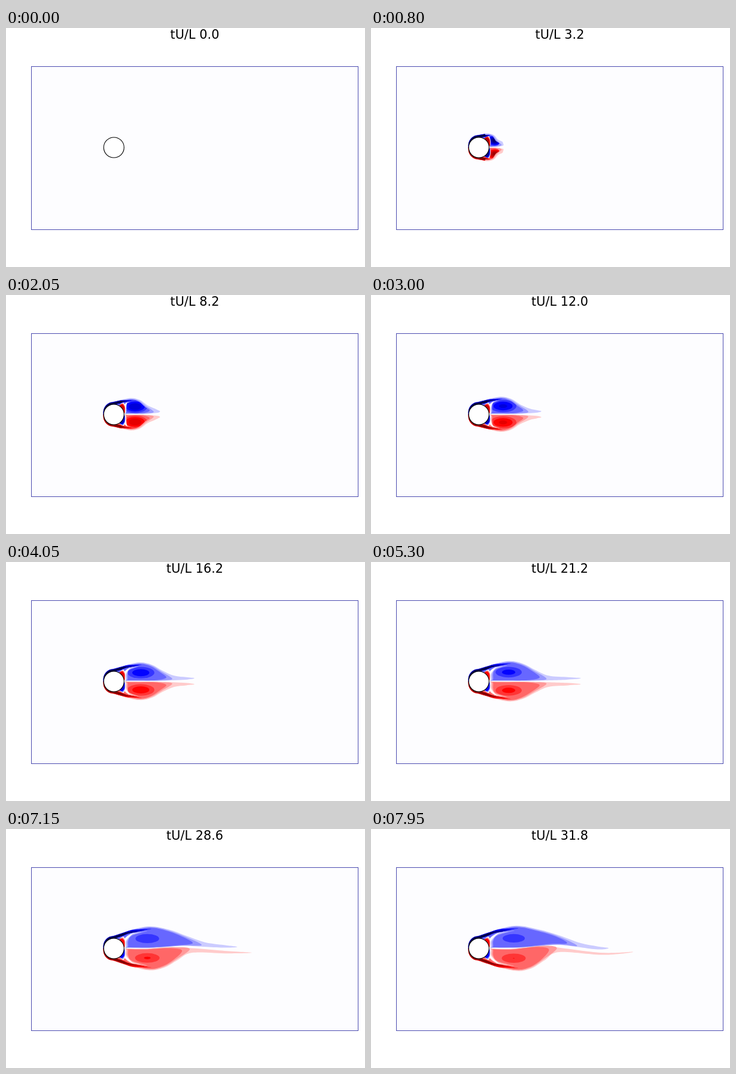
An HTML page with a canvas for the animation above (8000 ms loop, 600 by 400 pixels).

```html
<!DOCTYPE html>
<html lang="en">
<head>
<meta charset="utf-8">
<title>Cylinder wake vorticity</title>
<style>
html, body { margin: 0; width: 100%; height: 100%; overflow: hidden; background: #fff; }
canvas { display: block; }
</style>
</head>
<body>
<canvas id="stage" width="600" height="400"></canvas>
<script>
const ctx = document.getElementById('stage').getContext('2d');
const STEP_MS = 50, STEPS = 160, DT = 0.2;
const CX = 180.3, CY = 200, RADIUS = 17;

const mix = (a, b, f) => a + (b - a) * f;
const mixPoint = (p, q, f) => [mix(p[0], q[0], f), mix(p[1], q[1], f)];
const clamp = v => Math.max(0, Math.min(1, v));

// Shape of one half of the wake; x runs downstream, y outward from the axis.
// The wake spreads with the square root of time, its tip drifts linearly,
// and late in the run a sway bends both halves the same way.
function wakeAt(t, blue) {
  const root = Math.sqrt(t);
  const growth = 1 - Math.exp(-t / 1.2);
  const sway = Math.max(0, (t - 21) / 11) ** 1.5;
  const side = blue ? 1 : -1;

  const bend = (x, y) => {
    const wave = 6 * Math.sin(Math.PI * (x - 65) / 100) * clamp((x - 40) / 60);
    return [x, y + side * sway * wave * (1 - y / 25)];
  };

  const neckX = Math.max(18, 27.5 * root - 10) + sway * (blue ? 25 : -11);
  const tipX = 18 + 7.2 * t + sway * (blue ? -31 : 11);
  const peak = [11 * root - 2, 16 + 3.85 * root];
  const shoulder = (f, height) => bend(mix(peak[0], neckX, f), peak[1] * height);
  const tail = (f, y) => bend(mix(neckX, tipX, f), y);
  return {
    t, growth, peak, neckX, bend,
    lift: [Math.min(9 + 0.22 * t, 0.75 * peak[0]), 16.5 + (6.5 + t / 8) * growth],
    shoulder1: shoulder(0.36, 0.88),
    shoulder2: shoulder(0.67, 0.56),
    tail: [tail(0, 9.3), tail(0.6, 6.8), tail(1, 5), tail(0.55, 2.6)],
    core: [12 + 8.2 * root, 9 + 1.35 * root],
    strength: 2.8 + 12 / root - 0.08 * side * sway,
    coreRadius: 43 * (1 - Math.exp(-t / 8))
  };
}

// Level 0 is the background, 5 the pure hue, 10 the darkest shade.
function shade(level, blue) {
  const pale = Math.max(0, 253 - 50 * level);
  const full = 255 - Math.max(0, level - 5) * (blue ? 36 : 25);
  return blue ? `rgb(${pale},${pale},${full})` : `rgb(${full},${pale},${pale})`;
}

// Closed Catmull-Rom curve.
function blob(points, color) {
  const n = points.length, at = i => points[(i + n) % n];
  ctx.beginPath();
  ctx.moveTo(...points[0]);
  for (let i = 0; i < n; i++) {
    const [p, a, b, q] = [at(i - 1), at(i), at(i + 1), at(i + 2)];
    ctx.bezierCurveTo(a[0] + (b[0] - p[0]) / 6, a[1] + (b[1] - p[1]) / 6,
      b[0] - (q[0] - a[0]) / 6, b[1] - (q[1] - a[1]) / 6, b[0], b[1]);
  }
  ctx.fillStyle = color;
  ctx.fill();
}

// Boundary layer on the front quarter, thickening away from the stagnation point.
function frontArc(growth, depth) {
  return Array.from({ length: 5 }, (_, i) => {
    const angle = mix(0.04, Math.PI / 2, i / 4);
    const r = RADIUS + 0.2 + 4.1 * growth * depth * Math.sin(angle);
    return [-r * Math.cos(angle), r * Math.sin(angle)];
  });
}

function outerOutline(w) {
  return [[-8, 0], ...frontArc(w.growth, 1), w.lift, w.peak, w.shoulder1, w.shoulder2,
    ...w.tail, w.bend(w.neckX * 0.75, 0.8), w.bend(w.neckX * 0.4, 0.6), [16, 0.5]];
}

function innerOutline(w, reach, endY, inset) {
  const d = inset * w.growth, endX = w.neckX * reach;
  const inward = (p, k) => [p[0] - k * d, p[1] - 1.2 * d];
  return [[-8, 0], ...frontArc(w.growth, 0.9), inward(w.lift, 0), inward(w.peak, 0),
    inward(w.shoulder1, 1.2), inward(w.shoulder2, 2.2), w.bend(endX, endY),
    w.bend(endX * 0.8, 0.8 + d / 2), w.bend(endX * 0.45, 0.6 + d / 2), [16, 0.5 + d / 2]];
}

function drawCore(w, blue) {
  const flat = 0.38 + 0.45 * Math.exp(-w.t / 7);
  for (let level = 4; level < w.strength; level++) {
    const r = w.coreRadius * Math.sqrt(Math.log(w.strength / level));
    ctx.beginPath();
    ctx.ellipse(...w.core, r, r * flat, 0, 0, 2 * Math.PI);
    ctx.fillStyle = shade(level, blue);
    ctx.fill();
  }
}

// Pale tongue between the shear layer and the recirculating core.
function drawGap(w, blue) {
  const end = [w.peak[0] - 2, w.peak[1] * 0.78];
  const size = clamp((end[0] - 20) / 25);
  if (!size) return;
  const mid = [mix(18, end[0], 0.3), mix(16, end[1], 0.66)];
  for (const level of [2, 1, 0]) {
    const e = level * 2 * size;
    blob([[17, 1.5], [17.5, 15], mid, mixPoint(mid, end, 0.25 + 0.4 * level),
      [mid[0] + 1, mid[1] - size - e * 0.6], [20 + e, 12], [19.6 + e, 2.5]],
      shade(level, blue));
  }
}

function drawShearLayer(w, blue) {
  const root = [w.lift[0], w.lift[1] - 0.6 - 2.8 * w.growth];
  const bend = [w.peak[0] * 0.6, w.peak[1] * 0.81];
  const end = [w.peak[0] * 1.1, w.peak[1] * 0.88];
  for (let level = 4; level <= 10; level++) {
    const s = (10 - level) / 6, reach = 0.25 + 0.75 * s;
    const rootHalf = (1.6 + s) * (0.3 + 0.7 * w.growth);
    const turn = mixPoint(root, bend, reach), turnHalf = 0.8 + 1.1 * s;
    const edge = sign => [
      [root[0], root[1] + sign * rootHalf],
      ...(bend[0] > root[0] ? [[turn[0], turn[1] + sign * turnHalf]] : [])
    ];
    blob([[-16, 0], ...frontArc(w.growth, 0.62 + 0.23 * s), ...edge(1),
      mixPoint(root, end, reach), ...edge(-1).reverse(), [0, 15]], shade(level, blue));
  }
}

// Opposite-signed layer on the rear wall of the cylinder.
function drawRearLayer(w, blue) {
  const size = clamp((w.t - 0.8) / 2), age = clamp(w.t / 25);
  if (!size) return;
  const top = Math.round(mix(8, 5, age)), step = mix(0.35, 0.6, age);
  for (let level = 0; level <= top; level++) {
    const i = level ? level * step : -0.5;
    const wall = (x, y) => [mix(16, x, size), y];
    blob([[8, 5], [16.8, 0.8 + 0.3 * i], wall(19.2 - 0.55 * i, 6), wall(19 - 0.6 * i, 12),
      wall(17.8 - 0.7 * i, 16 - 0.6 * i), wall(15 - 0.6 * i, 19 - 1.1 * i), [9, 14]],
      shade(level, !blue));
  }
}

function drawHalf(t, blue) {
  const w = wakeAt(t, blue);
  ctx.save();
  ctx.translate(CX, CY - 0.4);
  ctx.scale(1, blue ? -1 : 1);
  blob(outerOutline(w), shade(1, blue));
  blob(innerOutline(w, 0.97, 4, 1), shade(2, blue));
  blob(innerOutline(w, 0.87, 6, 2), shade(3, blue));
  ctx.save();
  ctx.clip();
  drawCore(w, blue);
  ctx.restore();
  drawGap(w, blue);
  drawRearLayer(w, blue);
  drawShearLayer(w, blue);
  ctx.restore();
}

function draw(t) {
  ctx.fillStyle = '#fff';
  ctx.fillRect(0, 0, 600, 400);
  ctx.fillStyle = shade(0, true);
  ctx.fillRect(42, 64, 547, 274);
  ctx.strokeStyle = '#4c4cb0';
  ctx.lineWidth = 1;
  ctx.strokeRect(42.5, 64.5, 546, 273);

  if (t > 0) {
    drawHalf(t, false);
    drawHalf(t, true);
  }

  ctx.beginPath();
  ctx.arc(CX, CY, RADIUS, 0, 2 * Math.PI);
  ctx.fillStyle = '#fff';
  ctx.fill();
  ctx.strokeStyle = '#000';
  ctx.lineWidth = 1.1;
  ctx.stroke();

  ctx.fillStyle = '#000';
  ctx.font = '20.83px "DejaVu Sans", sans-serif';
  ctx.textAlign = 'center';
  ctx.fillText('tU/L ' + t.toFixed(1), 315.5, 18.4);
}

const start = performance.now();
function tick() {
  const step = Math.floor((performance.now() - start) / STEP_MS) % STEPS;
  draw(step * DT);
  requestAnimationFrame(tick);
}
tick();
</script>
</body>
</html>
```
